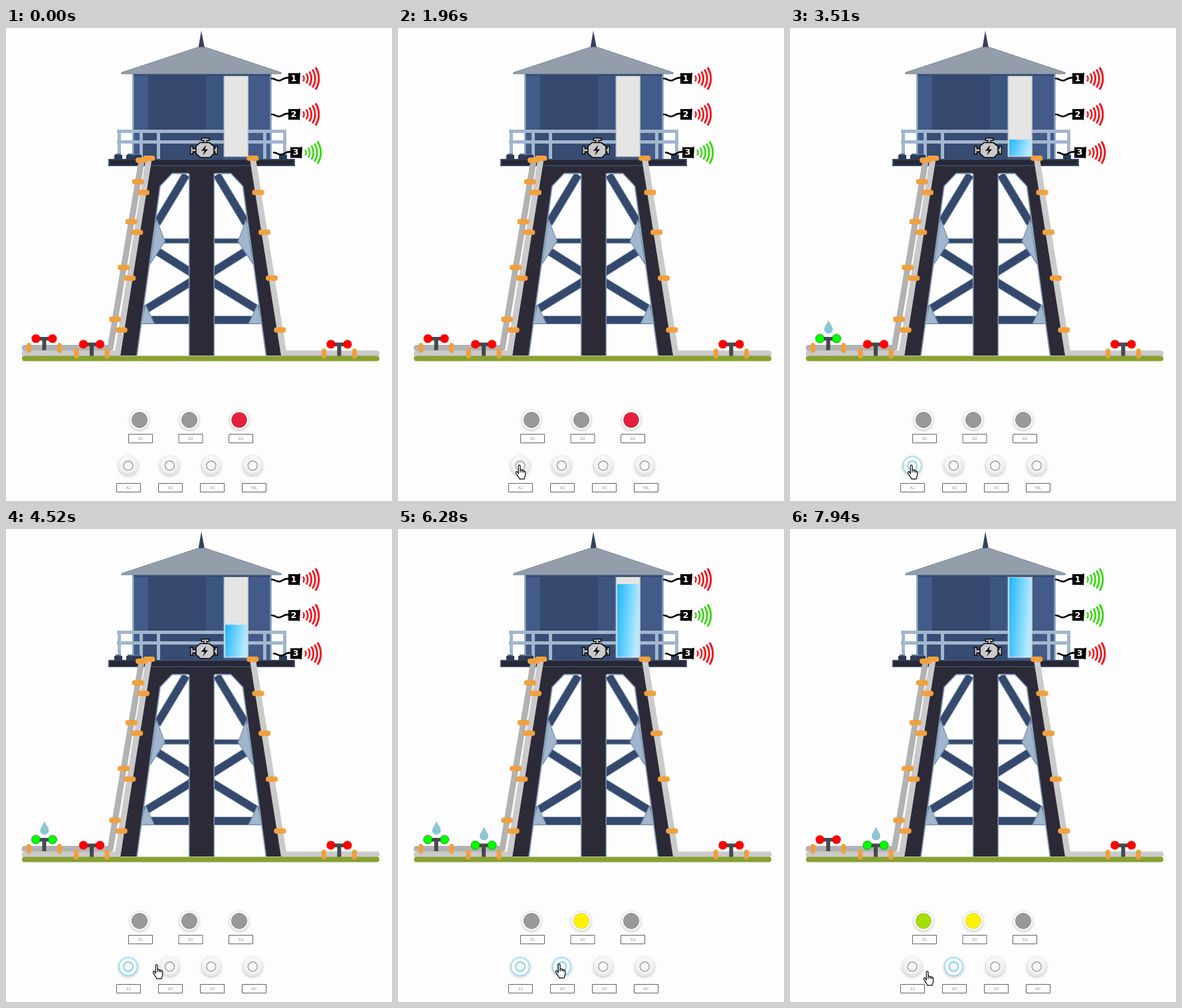
An HTML page with a canvas that plays this animation: 581 px wide and 712 px high, repeating every 8000 ms.

```html
<!DOCTYPE html>
<html lang="en">
<head>
<meta charset="utf-8">
<title>Water tower</title>
<style>
html, body { margin: 0; width: 100%; height: 100%; overflow: hidden; background: #fdfdfd; }
canvas { display: block; }
</style>
</head>
<body>
<canvas id="stage" width="581" height="712"></canvas>
<script>
const ctx = document.getElementById('stage').getContext('2d');
const LOOP = 8000, TICK = 110.6, FIRST = 310;
const NAVY = '#34496b', DARK = '#2b2a36', EDGE = '#8299b5', PALE = '#a2b6cd', GREY = '#999';

// Moments of the story and the water range
const OPEN_A1 = 1970, OPEN_A2 = 4840, FULL = 6400, CLOSE_A1 = 7940;
const BOTTOM = 193, BRIM = 73, HALF = 127;

// Pointer moves: start, end, and where it comes to rest
const MOVES = [
  { from: 310, to: 650, x: 247, y: 617 },
  { from: 860, to: 1310, x: 176, y: 671 },
  { from: 1310, to: 1420, x: 176, y: 684 },
  { from: 1530, to: 1860, x: 177, y: 657 },
  { from: 4070, to: 4740, x: 237, y: 654 },
  { from: 6730, to: 7610, x: 173, y: 661 },
  { from: 7830, to: 7940, x: 201, y: 665 }
];

const clamp01 = v => Math.min(1, Math.max(0, v));
const smooth = v => v * v * (3 - 2 * v);
const mix = (a, b, k) => a + (b - a) * k;
const mirror = pts => pts.map(([x, y]) => [588.5 - x, y]);
const snap = (t, ticks = 1) =>
  FIRST + Math.floor((t - FIRST) / TICK / ticks + 0.06) * TICK * ticks;

function trace(pts) {
  ctx.beginPath();
  pts.forEach(([x, y]) => ctx.lineTo(x, y));
}
function poly(pts, fill, stroke, width = 1.5) {
  trace(pts);
  ctx.closePath();
  ctx.fillStyle = fill;
  ctx.fill();
  if (stroke) { ctx.lineWidth = width; ctx.strokeStyle = stroke; ctx.stroke(); }
}
function line(pts, color, width, cap = 'butt') {
  trace(pts);
  ctx.lineCap = cap;
  ctx.lineJoin = 'round';
  ctx.lineWidth = width;
  ctx.strokeStyle = color;
  ctx.stroke();
}
function rect(x, y, w, h, fill) {
  ctx.fillStyle = fill;
  ctx.fillRect(x, y, w, h);
}
function disc(x, y, r, fill, stroke, width = 1) {
  ctx.beginPath();
  ctx.arc(x, y, r, 0, 7);
  ctx.fillStyle = fill;
  ctx.fill();
  if (stroke) { ctx.lineWidth = width; ctx.strokeStyle = stroke; ctx.stroke(); }
}
function text(str, x, y, font, color) {
  ctx.font = font;
  ctx.fillStyle = color;
  ctx.textAlign = 'center';
  ctx.textBaseline = 'middle';
  ctx.fillText(str, x, y);
}
function bothSides(draw, pts, ...style) {
  draw(pts, ...style);
  draw(mirror(pts), ...style);
}
function beam(a, b, width) {
  bothSides(line, [a, b], EDGE, width + 2);
  bothSides(line, [a, b], NAVY, width);
}

function drawFrame() {
  beam([271, 221], [227, 294], 11);
  beam([225, 320.5], [294.5, 320.5], 6);
  beam([226, 335], [280, 369], 11);
  beam([280, 381], [208, 425], 11);
  beam([205, 439.5], [294.5, 439.5], 11);
  bothSides(poly, [[227, 289], [239, 321], [217, 355]], PALE, EDGE);
  bothSides(poly, [[210, 417], [223, 445], [203, 445]], PALE, EDGE);
  const arch = [[275, 219], [250, 219], [232, 238], [197, 493]];
  bothSides(poly, [[216, 203], [294.5, 203], [294.5, 219], ...arch, [172, 493]], DARK);
  bothSides(line, arch, EDGE, 1.8);
  rect(275, 219, 39, 274, EDGE);
  rect(276.5, 203, 36, 290, DARK);
}

function drawTank() {
  poly([[294, 4], [299, 30], [289.5, 30]], '#344059');
  rect(190, 69, 210, 128, '#93a9c5');
  rect(192.5, 69, 205, 128, '#425b88');
  rect(301, 71, 27, 126, '#3d5680');
  rect(214, 72, 87, 81, '#34496d');
  rect(205, 157, 123, 40, '#364c73');
  rect(192.5, 69, 205, 3, '#354a6e');
  poly([[289, 29], [300, 29], [414, 67], [414, 69], [174, 69], [174, 67]], '#949eab', '#7d8da2', 1.2);
  rect(154, 197, 281, 11, '#40516e');
  rect(156, 198.5, 277, 8, '#272735');
  for (const x of [168, 201, 227, 387, 417]) rect(x, 155, 5, 42, PALE);
  for (const y of [153, 169]) rect(167, y, 255, 5, PALE);
  for (const x of [163, 181, 192, 411]) {
    rect(x, 191, 12, 7, '#2d3b57');
    rect(x + 2, 189, 8, 2, '#5a6f8f');
  }
}

function drawGauge(top) {
  rect(327.5, 72, 37.5, 122, '#bcbcbc');
  rect(329, 73, 34.5, 120, '#e5e5e5');
  if (top >= BOTTOM) return;
  ctx.save();
  ctx.translate(330, top);
  ctx.scale(33, BOTTOM - 0.5 - top);
  const water = ctx.createLinearGradient(0, 0, 1, 0.25);
  water.addColorStop(0, '#1cb6ff');
  water.addColorStop(1, '#b4eaff');
  rect(0, 0, 1, 1, water);
  ctx.restore();
}

function drawEngine() {
  const shell = '#c9c9c9', ink = '#080808';
  const fittings = [[294.5, 166, 11, 3], [298, 168, 4, 6]];
  for (const x of [278, 315]) fittings.push([x, 178.5, 3, 11]);
  for (const x of [280, 311]) fittings.push([x, 182, 7, 4]);
  for (const [color, grow] of [[ink, 1], [shell, -0.5]]) {
    for (const [x, y, w, h] of fittings) rect(x - grow, y - grow, w + 2 * grow, h + 2 * grow, color);
  }
  poly([[286, 178], [292, 172.5], [306, 172.5], [313, 178], [313, 189], [307, 195], [293, 195], [286, 189]],
    shell, ink, 1.6);
  poly([[301, 176], [294, 185], [299, 185], [296, 192], [304, 182.5], [299.5, 182.5]], ink);
}

function drawSensor(n, x, y, active) {
  ctx.lineWidth = 2.6;
  ctx.lineCap = 'round';
  ctx.strokeStyle = '#000';
  ctx.stroke(new Path2D(`M${x - 33} ${y}c6 0 7 4 12 3s6-5 14-4`));
  rect(x - 8, y - 8, 16, 16, '#000');
  poly([[x + 5, y - 7], [x + 10, y - 9], [x + 9, y + 9], [x + 5, y + 7]], '#000');
  text(n, x, y + 0.5, 'bold 13px "DejaVu Sans", sans-serif', '#fff');
  ctx.strokeStyle = active ? '#39da12' : '#f4141c';
  ctx.lineCap = 'butt';
  for (let i = 0; i < 5; i++) {
    ctx.lineWidth = 2.4 + i * 0.15;
    ctx.beginPath();
    ctx.arc(x + 7.5, y, 8 + i * 5.6, -0.58, 0.58);
    ctx.stroke();
  }
}

function clip(x, y, w, h) {
  ctx.fillStyle = '#f0a03c';
  ctx.beginPath();
  ctx.roundRect(x - w / 2, y - h / 2, w, h, 3.5);
  ctx.fill();
}

// A pipe up a leg and along the ground, with clips spread wider towards the foot
function drawPipe(head, foot, end, color, lift = 0) {
  line([head, foot, end], color, 9, 'round');
  return () => {
    for (let i = 0; i < 5; i++) {
      const y = Math.max(head[1] - 1, 196 + 47 * i + 4.4 * i * i - lift);
      clip(mix(head[0], foot[0], (y - head[1]) / (foot[1] - head[1])), y, 18, 8);
    }
  };
}

function drawPipes() {
  const clips = [
    drawPipe([204, 200], [157, 481.5], [28, 481.5], '#b2b2b2', 16),
    drawPipe([215, 197], [168, 490], [28, 490], '#cacaca'),
    drawPipe([371.5, 197], [418, 490], [558, 490], '#cacaca')
  ];
  line([[28, 497.5], [558, 497.5]], '#89a132', 8, 'round');
  clips.forEach(draw => draw());
}

function drawValve(x, y, open) {
  for (const side of [-1, 1]) clip(x + side * 23, y + 14, 7, 15);
  rect(x - 9, y - 2.5, 18, 5.5, '#46484c');
  rect(x - 3, y, 6, 17.5, '#46484c');
  for (const side of [-12.5, 12.5]) {
    disc(x + side, y, 6.6, open ? '#00ff00' : '#ff0000', open && 'rgba(20,80,20,.7)', 0.8);
  }
  if (!open) return;
  ctx.fillStyle = '#8bc6d0';
  ctx.fill(new Path2D(`M${x + 0.5} ${y - 28}c2 6 6.5 10 6.5 14.5a6.5 6 0 0 1-13 0c0-4.5 4.5-8.5 6.5-14.5z`));
}

function softDisc(x, y, r, fill) {
  ctx.save();
  ctx.shadowColor = 'rgba(0,0,0,.28)';
  ctx.shadowBlur = 4;
  ctx.shadowOffsetY = 1;
  disc(x, y, r, fill);
  ctx.restore();
}

function label(str, x, y) {
  ctx.lineWidth = 1;
  ctx.strokeStyle = '#626262';
  rect(x, y, 37, 13, '#fff');
  ctx.strokeRect(x + 0.5, y + 0.5, 36, 13);
  text(str, x + 18.5, y + 7.3, '6px "Liberation Sans", sans-serif', '#888');
}

function drawLamp(i, color) {
  const x = 201 + 75 * i;
  softDisc(x, 590, 14.5, '#f8f8f8');
  disc(x, 590, 11.5, color, color === GREY ? '#858585' : 'rgba(0,0,0,.14)');
  label('S' + (i + 1), 184 + 75.5 * i, 611);
}

function drawButton(str, i, state) {
  const x = 184 + 62.4 * i, y = 658.8;
  const on = state === 'on', pressed = state === 'pressed';
  const shade = ctx.createLinearGradient(0, y - 15, 0, y + 15);
  shade.addColorStop(0, pressed ? '#c9c9c2' : '#fafafa');
  shade.addColorStop(1, pressed ? '#f0f0ee' : '#e5e5e5');
  softDisc(x, y, 14.5, shade);
  if (on) disc(x, y, 13.7, '#f3fafd', '#86d6f3', 1.3);
  disc(x, y, 11, on ? '#fff' : pressed ? '#deded9' : '#f4f4f4');
  disc(x, y, 7, '#f8f8f8', on ? '#62c6ea' : pressed ? '#85857c' : '#a2a2a2', 1.5);
  label(str, 166 + 63 * i, 685);
}

function drawCursor([x, y]) {
  ctx.save();
  ctx.translate(x - 0.5, y);
  ctx.scale(0.95, 1);
  ctx.lineWidth = 1.2;
  ctx.lineJoin = 'round';
  ctx.strokeStyle = '#000';
  ctx.fillStyle = '#fff';
  const hand = new Path2D('M5 14V2.3C5 .4 8 .4 8 2.3V8.6C9 7.6 10.7 7.8 11 9.2 ' +
    '12 8.4 13.4 8.8 13.6 10 14.8 9.4 16 10 16 11.5V15.5C16 17.5 14.6 18.5 14.4 21.8' +
    'H6.6C6.4 19.5 1.2 14.5 .9 12.4.8 10.6 2.6 10 3.6 11.4Z');
  ctx.fill(hand);
  ctx.stroke(hand);
  ctx.stroke(new Path2D('M8 8.6V12M11 9.2V12M13.6 10V12.5'));
  ctx.restore();
}

function cursorAt(t) {
  let x = 382, y = 645;
  for (const move of MOVES) {
    const k = smooth(clamp01((t - move.from) / (move.to - move.from)));
    x = mix(x, move.x, k);
    y = mix(y, move.y, k);
  }
  return [Math.round(x), Math.round(y)];
}

// One valve fills slowly, the second adds to the flow; the gauge moves every other tick.
function waterTop(t) {
  if (t >= FULL) return BRIM;
  const s = snap(t, 2), since = start => Math.max(0, s - start);
  return BOTTOM - 0.0215 * since(2240) - 0.016 * since(OPEN_A2);
}

function render(t) {
  const top = waterTop(t);
  const full = top <= BRIM, half = top <= HALF, empty = top >= BOTTOM;
  const a1 = t >= OPEN_A1 && t < CLOSE_A1, a2 = t >= OPEN_A2;
  const state = (open, settled) => !open ? 'off' : t < settled ? 'pressed' : 'on';
  rect(0, 0, 581, 712, '#fdfdfd');
  drawFrame();
  drawTank();
  drawGauge(top);
  drawEngine();
  drawPipes();
  drawValve(57.5, 467.5, a1);
  drawValve(129, 476, a2);
  drawValve(501.5, 476, false);
  drawSensor(1, 433, 76, full);
  drawSensor(2, 433, 130, half);
  drawSensor(3, 436, 187.5, empty);
  drawLamp(0, full ? '#a5df05' : GREY);
  drawLamp(1, half ? '#fff200' : GREY);
  drawLamp(2, empty ? '#e5203e' : GREY);
  drawButton('A1', 0, state(a1, 2520));
  drawButton('A2', 1, state(a2, 5060));
  drawButton('A3', 2, 'off');
  drawButton('M1', 3, 'off');
  if (t >= FIRST) drawCursor(cursorAt(snap(t)));
}

const start = performance.now();
function loop() {
  render((performance.now() - start) % LOOP);
  requestAnimationFrame(loop);
}
loop();
</script>
</body>
</html>
```
